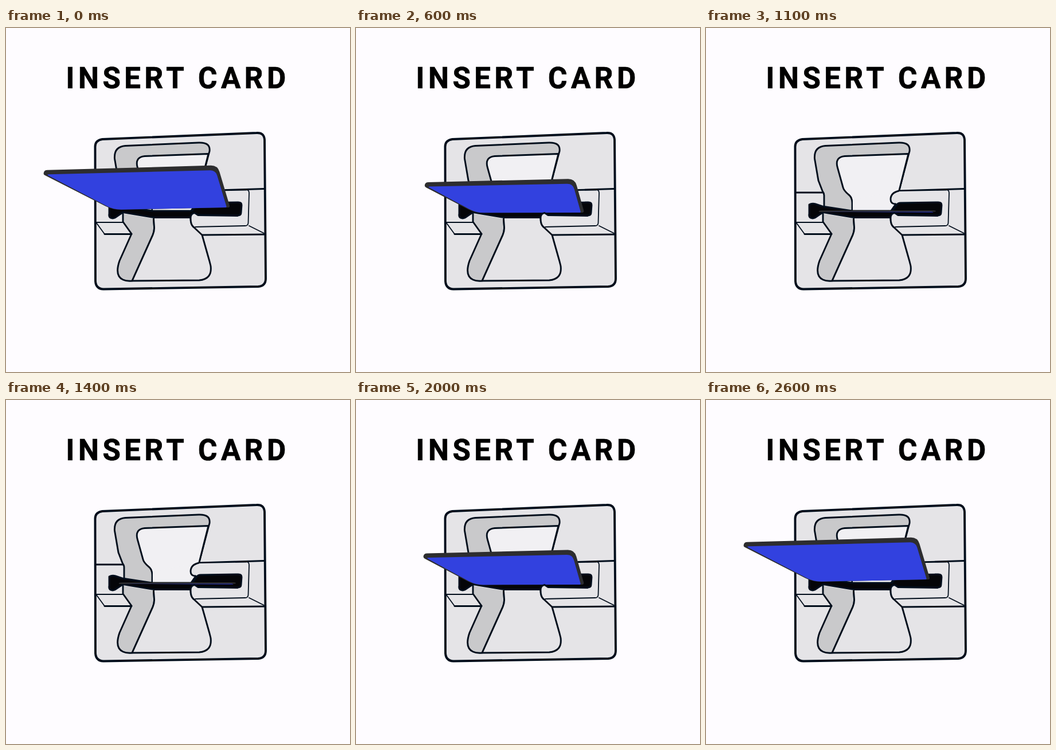
Write an HTML page that moves like this. It is 600 px wide and 600 px high and loops after 2.7 s.

```html
<!DOCTYPE html>
<html lang="en">
<head>
<meta charset="utf-8">
<title>Insert card</title>
<style>
  html, body { margin: 0; width: 100%; height: 100%; overflow: hidden; background: #fefcff; }
  svg { display: block; width: 100vw; height: 100vh; }
  text { font: 700 51px Roboto, sans-serif; letter-spacing: 6.5px; stroke: #000; stroke-width: .7; }
  .line { fill: none; stroke: #020e1c; stroke-width: 2.9; stroke-linecap: round; stroke-linejoin: round; }
  .thin { stroke-width: 1.8; }
  .body { fill: #e5e4e7; stroke-width: 3.9; }
  .wall { fill: #c9c9cb; }
  .back { fill: #f1f0f3; }
  .face { fill: #e5e4e7; }
  .slot { fill: #050508; }
</style>
</head>
<body>
<svg viewBox="0 0 600 600">
  <text x="104.6" y="105">INSERT CARD</text>

  <!-- housing -->
  <path class="line body" d="M155.5 208Q155 196 168 194L437 183Q450 182 451 195L453 437Q453 450 440 451L170 455.5Q157 455 156 442Z"/>
  <path class="line" d="M157 287H204M337 284L450 280.5"/>

  <!-- upper recess -->
  <path class="line wall" d="M206 313V292Q206 288 203 284L196 266L189.5 228Q188 207 208 205.5L336 200Q357 199 355 215L353 222L337 283L255 318"/>
  <path class="line back" d="M255 318V305Q255 295 248 290Q240 283 239 278L229 242Q225 225 242 223.5L353 219.5L337 283"/>
  <path class="back" d="M256 319V300L337 283L324 319Z"/>

  <!-- right pad -->
  <path class="line face" d="M327 347L322 332V320L331 307Q322 307 322 299Q322 287 337 284"/>
  <path class="line thin face" d="M337 284L419 282.5Q424 282 424 288L422.5 340Q422 345 417 345L327 347M424 345L450 358"/>

  <!-- card slot -->
  <path class="line slot" d="M180 308Q185 305 191 307L203 311L255 319H325L333 308Q335 305 339 305L405 304Q411 304 411 309L410 322Q410 327 404 327L333 326L323 330.5H258L204 321.5L190 331Q186 333 182 331Q179 329 180 324Z"/>

  <path id="rim" fill="#2d2d2f"/>
  <path id="card" fill="#3241df"/>

  <!-- lower front -->
  <path class="line wall" d="M204 324V338L219 359L198 406Q189 432 204 439Q210 442 220 441L256 361Q259 354 258.5 347L257.5 333"/>
  <path class="line face" d="M257.5 333L258.5 347Q259 354 256 361L220 441L337 440Q360 438 357 415L355 407L342 361L327 347Q322 343 322 332"/>
  <path class="line face" d="M327 347Q322 343 322 332Q322 323 329 322.5L335 326.5L404 327.5"/>
  <path class="line" d="M342 361L452 360M219 359.5H172"/>
  <path class="line thin" d="M204 339H157L172 359.5"/>
</svg>
<script>
  // Corners of the card: top left, top right, bottom right, bottom left
  const raised = [[67, 248], [369, 239.5], [391, 313], [186, 317]];
  const level = [[115, 265], [380, 258.5], [398, 322], [205, 322.5]];
  const inside = [[198, 318.3], [401, 318], [401, 320.6], [238, 320.8]];
  const LOOP = 2700, STEP = 100;

  const mix = (p, q, u) => p.map((v, k) => v + (q[k] - v) * u);
  const shift = ([x, y], dx, dy) => [x + dx, y + dy];
  const ease = u => u < 0.5 ? 2 * u * u : 1 - 2 * (1 - u) ** 2;
  const ramp = (t, from, to) => ease(Math.min(1, Math.max(0, (t - from) / (to - from))));

  // 0 is raised, 1 level with the slot, 2 inside
  const depth = t =>
    ramp(t, 0, 500) + ramp(t, 480, 1100) - ramp(t, 1450, 2100) - ramp(t, 2090, 2500);

  function pose(d) {
    const [a, b, u] = d < 1 ? [raised, level, d] : [level, inside, d - 1];
    return a.map((p, i) => mix(p, b[i], u));
  }

  function toward(p, q, r) {
    const len = Math.hypot(q[0] - p[0], q[1] - p[1]) || 1;
    return mix(p, q, Math.min(0.5, r / len));
  }

  function rounded(pts, radii) {
    const n = pts.length;
    return pts.map((p, i) => {
      const from = toward(p, pts[(i + n - 1) % n], radii[i]);
      const to = toward(p, pts[(i + 1) % n], radii[i]);
      return `${i ? "L" : "M"}${from}Q${p} ${to}`;
    }).join("") + "Z";
  }

  const rim = document.getElementById("rim");
  const card = document.getElementById("card");

  function draw(now) {
    const t = Math.floor((now % LOOP) / STEP) * STEP;
    const [tl, tr, br, bl] = pose(depth(t));
    const edge = Math.min(7.5, br[1] - tr[1]);
    const outer = [tl, tr, br, bl, shift(tl, -2, edge)];
    const inner = [shift(tl, 3, edge), shift(tr, -3.5, edge + 1), shift(br, -6, 0), shift(bl, 2, 0)];
    rim.setAttribute("d", rounded(outer, [5, 12, 4, 14, 3]));
    card.setAttribute("d", rounded(inner, [5, 10, 2, 14]));
  }

  const start = performance.now();
  function tick() {
    draw(performance.now() - start);
    requestAnimationFrame(tick);
  }
  tick();
</script>
</body>
</html>
```
